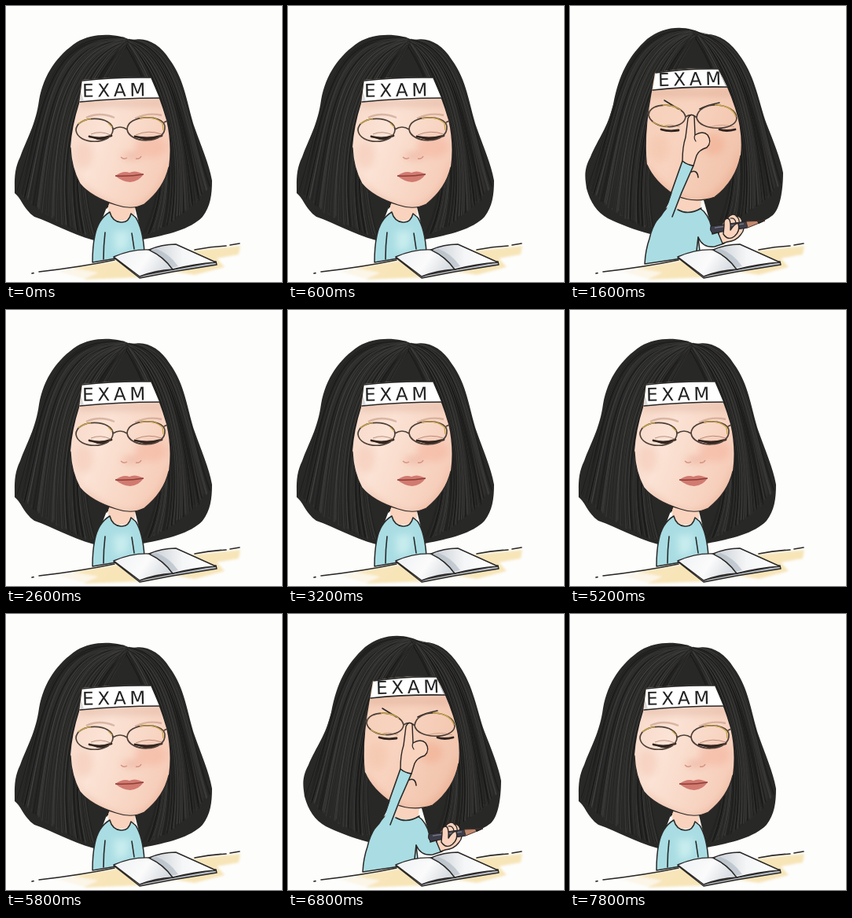
Animation of 351 by 351 pixels, one loop 8 s. Source, as an HTML page:

```html
<!DOCTYPE html>
<html lang="en">
<head>
<meta charset="utf-8">
<title>Exam study</title>
<style>
  html, body { margin: 0; width: 100%; height: 100%; overflow: hidden; background: #fdfdfc; }
  svg { display: block; width: 100vw; height: 100vh; }
  text { font: 23px "DejaVu Sans", sans-serif; letter-spacing: 4.8px; fill: #222; }
  .line { fill: none; stroke: #2a2827; stroke-width: 1.6; stroke-linecap: round; stroke-linejoin: round; }
  .thin { stroke-width: 1.2; }
  .shirt { fill: #a9dde3; stroke: #2a2827; stroke-width: 1.5; stroke-linejoin: round; }
  .skin { fill: #f9d3bd; stroke: #2a2422; stroke-width: 1.4; stroke-linejoin: round; }
  .flat { stroke: none; }
  .frame { fill: none; stroke: #4d4038; stroke-width: 1.7; }
  .gold { fill: none; stroke: #c8a64b; stroke-width: 1.4; }
  .soft { filter: url(#blur); }
  .wash { filter: url(#wash); }
  .edge, .hair { filter: url(#edge); }
  .lash { fill: none; stroke: #30241f; stroke-width: 2.8; stroke-linecap: round; filter: url(#edge); }
</style>
</head>
<body>
<svg viewBox="0 0 351 351" preserveAspectRatio="none">
  <defs>
    <filter id="blur" x="-60%" y="-60%" width="220%" height="220%"><feGaussianBlur stdDeviation="5"/></filter>
    <filter id="wash" x="-20%" y="-40%" width="140%" height="180%"><feGaussianBlur stdDeviation="1.8"/></filter>
    <filter id="edge" x="-30%" y="-200%" width="160%" height="500%"><feGaussianBlur stdDeviation=".55"/></filter>
    <linearGradient id="calmSkin" x2="1" y2=".5">
      <stop stop-color="#f6d5c4"/><stop offset=".45" stop-color="#fbe3d5"/><stop offset="1" stop-color="#f6cdb9"/>
    </linearGradient>
    <linearGradient id="crossSkin" x2="1" y2=".6">
      <stop stop-color="#f5cfb9"/><stop offset=".5" stop-color="#f8d3bf"/><stop offset="1" stop-color="#f1c3ab"/>
    </linearGradient>
    <linearGradient id="page" x2="1" y2=".3">
      <stop stop-color="#eef0f3"/><stop offset=".6" stop-color="#fbfbfb"/><stop offset="1" stop-color="#d8dde2"/>
    </linearGradient>
    <linearGradient id="pageRight" x2="1">
      <stop stop-color="#c6ccd2"/><stop offset=".5" stop-color="#f5f6f7"/><stop offset="1" stop-color="#fff"/>
    </linearGradient>
    <clipPath id="calmFace"><path d="M97 94 Q140 89 183 91 Q195 114 204 145 Q211 175 207 205 Q201 232 176 252 Q160 260 140 253 Q108 243 94 226 Q83 206 82 180 Q84 152 93 124Z"/></clipPath>
    <clipPath id="crossFace"><path d="M108 85 Q148 77 188 80 Q200 100 210 130 Q220 160 217 190 Q211 222 184 243 Q158 252 132 240 Q107 223 98 202 Q94 165 103 115Z"/></clipPath>
    <clipPath id="calmBand"><path d="M97 95 Q140 90 184 91 L195 117 Q145 117 94 122Z"/></clipPath>
    <clipPath id="crossBand"><path d="M109 85 Q150 79 188 80 L200 103 Q150 102 105 107Z"/></clipPath>
  </defs>

  <rect width="351" height="351" fill="#fdfdfc"/>
  <g class="wash" fill="#f7e5b8">
    <path d="M85 333 L140 324 L190 316 L298 305 L296 316 L268 321 L278 332 L240 342 L215 338 L172 345 L98 348 L118 339Z"/>
    <path d="M65 337 L140 327 L120 346 L95 346Z" opacity=".3"/>
  </g>
  <path class="line" d="M33 340 l2 -.4 M42 338 Q95 332 138 323 M240 310 Q260 306 280 305 M285 304 L297 302"/>

  <g id="calm">
    <g class="hair"></g>
    <path class="skin flat" d="M130 246 L130 266 Q147 281 164 265 L164 246Z"/>
    <path class="shirt" d="M132 262 Q117 271 113 292 Q110 306 110 326 L140 321 L176 313 Q174 283 165 269 L159 264 Q156 276 146 275 Q135 274 132 262Z"/>
    <path class="soft" d="M137 285 Q150 290 157 283 L154 308 L139 313Z" fill="#c9edef"/>
    <path class="line" d="M126 288 Q124 305 124 322 M160 289 L163 309 M131 250 l-3 7"/>
    <g clip-path="url(#calmFace)">
      <rect x="75" y="85" width="140" height="180" fill="url(#calmSkin)"/>
      <g class="soft">
        <ellipse cx="184" cy="179" rx="20" ry="14" fill="#f3ac94" opacity=".45"/>
        <ellipse cx="99" cy="190" rx="12" ry="17" fill="#f2b9a5" opacity=".35"/>
        <ellipse cx="160" cy="191" rx="13" ry="5" fill="#e9a691" opacity=".55"/>
        <path d="M87 210 Q112 249 155 257 Q195 248 208 196 L216 250 L120 270Z" fill="#e5aa91" opacity=".55"/>
        <path d="M93 119 H200 V128 H93Z" fill="#d9aa94" opacity=".5"/>
      </g>
      <path class="edge" d="M102 142 Q119 134 138 142 M164 143 Q181 135 198 139" fill="none" stroke="#b98974" stroke-width="2.4" opacity=".5"/>
    </g>
    <path class="line thin" d="M82 180 Q83 206 94 226 Q108 243 140 253 Q160 260 176 252 Q201 232 207 205"/>
    <path class="lash" d="M106 166 Q120 170 134 165 M164 166 Q181 170 198 165"/>
    <path d="M108 163 Q120 158 133 164 M165 164 Q181 157 198 163" fill="none" stroke="#9d6c57" opacity=".7"/>
    <path d="M111 168 Q121 173 131 168Z M169 168 Q181 173 193 168Z" fill="#33241e"/>
    <path class="edge" d="M146 192 q4 4 8 1 M165 194 q5 1 7 -3" fill="none" stroke="#c87d69" stroke-width="1.5" opacity=".7"/>
    <path class="edge" d="M139 216 Q149 209 157 212 Q164 208 175 214 Q169 223 158 224 Q147 223 139 216Z" fill="#d17a70"/>
    <path d="M139 216 Q157 217 175 214" fill="none" stroke="#8e3e3a" stroke-width="1.5"/>
    <path class="frame" d="M89 158 C89 138 137 139 136 158 C134 177 91 177 89 158Z M154 157 C154 138 200 137 202 153 C204 176 157 176 154 157Z M136 157 Q145 151 154 157 M201 148 l4 -2"/>
    <path class="gold" d="M92 150 Q99 144 108 144 M130 149 l5 5 M170 143 Q188 139 199 149 l1 9"/>
    <g clip-path="url(#calmBand)">
      <rect x="90" y="85" width="110" height="42" fill="#fff"/>
      <text x="97" y="115" transform="rotate(-1 140 107)">EXAM</text>
      <path d="M92 104 l5 17 M186 90 l10 25" stroke="#b6b6b6" stroke-width="4" opacity=".5"/>
    </g>
    <path class="line" d="M97 95 Q140 90 184 91 M94 122 Q145 117 195 117"/>
  </g>

  <g id="cross">
    <g class="hair"></g>
    <path class="shirt" d="M132 250 Q107 268 101 296 Q96 310 95 328 L142 321 L165 311 L163 294 Q169 308 184 306 L196 302 L188 288 L181 290 Q180 272 170 261 L161 254Z"/>
    <path class="skin flat" d="M134 236 L168 236 L166 257 Q150 265 135 258Z"/>
    <path class="line" d="M137 259 Q151 267 167 257 M163 294 L161 311"/>
    <g clip-path="url(#crossFace)">
      <rect x="88" y="75" width="135" height="180" fill="url(#crossSkin)"/>
      <g class="soft">
        <ellipse cx="182" cy="176" rx="15" ry="14" fill="#f0a07f" opacity=".4"/>
        <ellipse cx="114" cy="181" rx="13" ry="17" fill="#f1a98e" opacity=".2"/>
        <path d="M98 202 Q126 240 160 247 Q200 238 216 180 L225 250 L110 260Z" fill="#e8a587" opacity=".5"/>
        <path d="M100 106 H207 V115 H100Z" fill="#d7a48b" opacity=".5"/>
      </g>
    </g>
    <path class="line thin" d="M98 202 Q107 223 132 240 Q158 252 184 243 Q211 222 217 190"/>
    <path class="line" d="M120 120 L138 131 M165 131 Q174 126 190 123"/>
    <path class="lash" d="M116 157 Q126 160 138 158 M190 157 Q199 160 210 157"/>
    <path d="M118 153 Q128 149 140 154 M177 154 Q194 149 209 154" fill="none" stroke="#b48168" opacity=".6"/>
    <path class="frame" d="M100 139 C101 120 143 123 147 141 C145 159 104 157 100 139Z M161 142 C163 119 211 122 212 143 C210 160 164 159 161 142Z M147 141 Q155 136 161 142"/>
    <path class="gold" d="M118 126 Q134 126 141 133 M105 147 Q113 153 124 153 M184 126 Q206 126 211 141"/>
    <path class="line" d="M154 211 Q162 208 163 218"/>
    <path class="shirt flat" d="M143 197 L123 258 L106 292 L130 292 L132 264 L157 203Z"/>
    <path class="line" d="M111 272 Q121 262 126 245 L143 197 Q149 202 157 203 L142 237 L130 268"/>
    <path class="skin" d="M143 197 Q143 179 147 167 L150 143 Q153 136 158 140 L159 164 Q169 158 175 164 Q181 173 174 180 Q164 183 161 190 L157 203 Q149 202 143 197Z"/>
    <path class="line thin" d="M159 164 Q157 168 160 172"/>
    <path class="skin" d="M189 290 Q190 278 200 270 Q206 262 212 267 Q219 268 219 276 Q224 283 217 291 Q211 299 200 300 L194 302Z"/>
    <path d="M179 280 L224 274 L226 282 L181 289 Q177 285 179 280Z" fill="#3d3c49" stroke="#222"/>
    <path d="M224 274 L248 273 L226 282Z" fill="#c18b70" stroke="#4b342b"/>
    <path d="M238 274 L248 273 L240 277Z" fill="#222"/>
    <path d="M184 282 L221 277" stroke="#777583" stroke-width="1.5"/>
    <path class="skin" d="M196 279 Q195 270 201 270 Q205 272 204 285 Q211 275 214 277 Q217 286 209 293 Q201 299 195 290Z"/>
    <path class="line thin" d="M204 270 Q210 269 211 276 M211 267 Q216 270 215 277"/>
    <g clip-path="url(#crossBand)">
      <rect x="100" y="75" width="105" height="38" fill="#fff"/>
      <text x="112" y="101" transform="rotate(-1.5 150 94)">EXAM</text>
      <path d="M189 78 l11 24" stroke="#777" stroke-width="4" opacity=".5"/>
    </g>
    <path class="line" d="M109 85 Q150 79 188 80 M105 107 Q150 102 200 103"/>
  </g>

  <g stroke="#2a2827" stroke-width="1.4" stroke-linejoin="round">
    <path d="M137 320 L170 346 L212 338 L268 329 L267 325 L212 335 L170 343Z" fill="#b8bdc3"/>
    <path d="M137 319 Q160 309 182 310 Q201 319 212 335 Q190 336 170 344Z" fill="url(#page)"/>
    <path d="M182 310 Q198 303 216 303 L267 326 Q239 328 212 335 Q201 319 182 310Z" fill="url(#pageRight)"/>
    <path class="flat" d="M184 311 Q201 318 211 333 L219 331 Q207 314 191 309Z" fill="#aeb8c1" opacity=".6"/>
  </g>
</svg>
<script>
  const STEP = 200, CYCLE = 13, CROSS_START = 5, CROSS_END = 12, LOOP = 8000;

  function randomizer(seed) {
    return () => (seed = (seed * 16807) % 2147483647) / 2147483647;
  }

  function addPath(parent, attributes) {
    const path = document.createElementNS("http://www.w3.org/2000/svg", "path");
    for (const key in attributes) path.setAttribute(key, attributes[key]);
    parent.append(path);
  }

  // Strands blend from the outer curve of each side to its inner curve.
  function drawHair(id, outline, sides) {
    const group = document.querySelector(`#${id} .hair`);
    const random = randomizer(71);
    const tones = ["#131313", "#1d1d1c", "#373635", "#474644"];
    addPath(group, { d: outline, fill: "#282827" });
    for (const [outer, inner] of sides) {
      for (let i = 0; i < 95; i++) {
        const mix = i / 94;
        const p = outer.map((v, k) => v + (inner[k] - v) * mix + (random() - .5) * 5);
        p[7] += 8 * Math.sin(Math.PI * mix);
        addPath(group, {
          d: `M${p[0]} ${p[1]} C${p.slice(2).map(v => v.toFixed(1)).join(" ")}`,
          fill: "none", stroke: tones[Math.floor(random() * tones.length)],
          "stroke-width": (.5 + random()).toFixed(2), opacity: .6
        });
      }
    }
  }

  drawHair("calm",
    "M160 44 C140 34 110 34 90 46 C66 62 48 86 42 120 C38 150 26 170 18 192 C10 208 11 222 11 238 C20 245 22 258 36 268 C60 276 82 290 112 298 L128 256 L164 256 L174 297 C205 291 235 284 250 268 C260 255 262 240 262 222 C258 200 248 178 240 155 C230 125 228 95 208 68 C196 48 176 38 160 44Z",
    [
      [[150, 42, 50, 32, 48, 120, 15, 236], [153, 50, 135, 85, 75, 165, 112, 292]],
      [[155, 44, 222, 45, 226, 135, 259, 230], [155, 50, 170, 85, 225, 180, 177, 290]]
    ]);
  drawHair("cross",
    "M170 36 C150 24 120 24 98 42 C74 64 62 88 55 125 C48 155 36 168 26 192 C16 210 20 222 21 232 C26 250 34 262 48 270 C65 278 80 284 102 290 L132 240 L168 240 L180 282 L196 284 C225 284 245 276 258 266 C267 258 271 235 271 212 C268 195 258 170 250 150 C240 122 236 92 218 66 C204 44 186 34 170 36Z",
    [
      [[150, 32, 60, 30, 60, 130, 23, 232], [160, 40, 140, 70, 85, 160, 104, 282]],
      [[160, 35, 234, 42, 236, 130, 268, 226], [162, 40, 175, 70, 232, 170, 192, 276]]
    ]);

  const calm = document.getElementById("calm");
  const cross = document.getElementById("cross");
  const start = performance.now();

  function render(now) {
    const time = Math.max(0, now - start) % LOOP;
    const beat = Math.floor(time / STEP) % CYCLE;
    const isCross = beat >= CROSS_START && beat < CROSS_END;
    calm.style.display = isCross ? "none" : "";
    cross.style.display = isCross ? "" : "none";
    requestAnimationFrame(render);
  }
  render(start);
</script>
</body>
</html>
```
